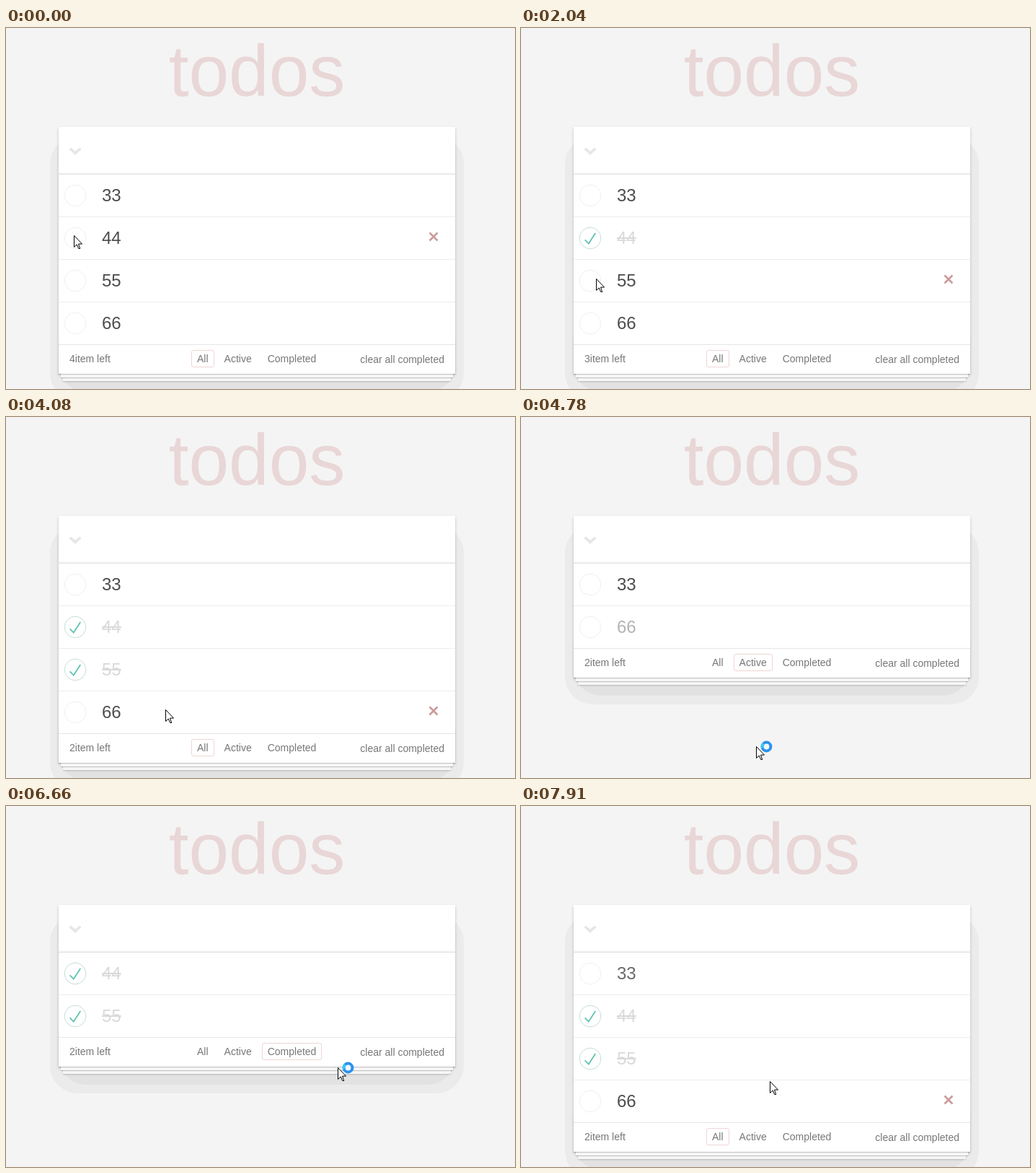
These frames come from a looping animation (706 by 500 pixels, 8 s). An HTML page:

```html
<!DOCTYPE html>
<html lang="en">
<head>
<meta charset="utf-8">
<title>todos</title>
<style>
  html, body { margin: 0; width: 100%; height: 100%; overflow: hidden; background: #f4f4f4; }
  body { position: relative; font: 14px/20px "Liberation Sans", Arial, sans-serif; color: #777; }
  div, span, svg { position: absolute; box-sizing: border-box; white-space: nowrap; }
  svg { overflow: visible; left: 0; top: 0; }
  #title { left: 73px; width: 550px; top: 2px; font-size: 100px; line-height: 115px;
    text-align: center; color: rgba(175, 47, 47, .15); }
  .halo { border-radius: 38px; }
  #outer { left: 61px; width: 574px; top: 150px; background: #ebebeb; }
  #inner { left: 73px; width: 550px; top: 162px; background: #e2e2e2; }
  #card { left: 73px; top: 137px; width: 550px; background: #fff; box-shadow: 0 2px 4px rgba(0, 0, 0, .2); }
  #entry, #list, #footer { left: 0; width: 550px; }
  #entry { top: 0; height: 65px; box-shadow: inset 0 -2px 1px rgba(0, 0, 0, .03); }
  #list { top: 65px; border-top: 1px solid #dfdfdf; }
  .row { left: 0; width: 550px; height: 59px; border-bottom: 1px solid #ededed; }
  .row span { left: 60px; top: 15px; font-size: 24px; line-height: 28px; }
  #footer { bottom: 0; height: 41px; border-top: 1px solid #e6e6e6; }
  #footer::after { content: ""; position: absolute; left: 0; bottom: 0; width: 550px; height: 50px;
    box-shadow: 0 1px 1px rgba(0, 0, 0, .2), 0 8px 0 -3px #f6f6f6, 0 9px 1px -3px rgba(0, 0, 0, .2),
      0 16px 0 -6px #f6f6f6, 0 17px 2px -6px rgba(0, 0, 0, .2); }
  #count { left: 15px; top: 9px; }
  #clear { right: 15px; top: 10px; }
  #filters { left: 184px; top: 7px; display: flex; gap: 6px; }
  #filters span { position: static; padding: 3px 7px; line-height: 16px;
    border: 1px solid transparent; border-radius: 3px; }
</style>
</head>
<body>
<div id="title">todos</div>
<div class="halo" id="outer"></div>
<div class="halo" id="inner"></div>
<div id="card">
  <div id="entry">
    <svg width="40" height="65"><path d="M15.5 30Q20 33 23 36.5Q26 33 30.5 30" fill="none" stroke="#e6e6e6" stroke-width="3.6"/></svg>
  </div>
  <div id="list"></div>
  <div id="footer">
    <span id="count"></span>
    <div id="filters"><span>All</span><span>Active</span><span>Completed</span></div>
    <span id="clear">clear all completed</span>
  </div>
</div>
<svg id="cursor" width="20" height="24" stroke="#000" fill="#fff" stroke-linejoin="round">
  <path id="arrow" d="M.5 .5V16.5L4.2 13 6.7 18.5H8.7L6.5 12.1H11.5Z"/>
  <path id="hand" transform="translate(-5)"
    d="M4 1.5Q5.5 -.5 7 1.5V7Q9 5.5 10 7.5Q12 6 13 8Q15.5 7 16.5 9.5V15Q16 18 14.5 21.5H6.5Q5 18 .8 13.5Q0 11 2 11L4 12.5Z"/>
  <g id="busy" transform="translate(14.5 .5)" stroke-width="4">
    <circle r="5.9" fill="#f2f6fa" stroke="#2a92ef"/>
    <path d="M-5.6 1.8A5.9 5.9 0 0 1 -4 -4.3" fill="none" stroke="#3cc6f2"/>
  </g>
</svg>
<script>
const LOOP = 8000, TICK = 120;
const GLIDE = 540, LAST_STOP = 7910;
const FADE = 400, FADE_LEAD = 40;
const ROW = 59, CARD_TOP = 137, LIST_TOP = 203, FOOTER = 41;

const todos = [33, 44, 55, 66];
const keepers = [() => true, done => !done, done => done];

// Each click leaves a number of ticked todos and a chosen filter.
const scenes = [[0, 0, 0], [1350, 1, 0], [2450, 2, 0], [4780, 2, 1], [6120, 2, 2], [7790, 2, 0]]
  .map(([at, ticked, filter]) => {
    const items = todos.map((value, i) => ({ value, done: i > 0 && i <= ticked }));
    return { at, filter, left: todos.length - ticked, rows: items.filter(item => keepers[filter](item.done)) };
  });

// The pointer sets off at a time towards x, y and arrives one glide later.
const home = { x: 94, y: 287 };
const glides = [[0, 100, 285], [1350, 104, 347], [2450, 349, 449], [3270, 124, 352], [3700, 318, 458],
  [4240, 326, 456], [4780, 364, 436], [5580, 385, 342], [6120, 460, 362], [6940, 272, 341], [7790, 345, 381]]
  .map(([at, x, y]) => ({ at, x, y }));

const $ = id => document.getElementById(id);
const show = (el, on) => { el.style.display = on ? '' : 'none'; };
const mix = (a, b, k) => Math.round(a + (b - a) * k);
const smooth = k => k * k * (3 - 2 * k);

const rows = todos.map((_, i) => {
  const el = document.createElement('div');
  el.className = 'row';
  el.style.top = i * ROW + 'px';
  el.innerHTML = `<svg width="550" height="58" fill="none">
    <g transform="translate(8.2 14.2) scale(.2963)">
      <circle cx="50" cy="50" r="50" stroke-width="3"/>
      <path d="M72 25L42 71 27 56l-4 4 20 20 34-52z" fill="#5dc2af"/>
    </g>
    <path d="M514.5 21.5l11 11m0-11l-11 11" stroke="#cc9a9a" stroke-width="2.6"/></svg><span></span>`;
  $('list').append(el);
  const [check, cross] = el.querySelectorAll('path');
  return { el, check, cross, ring: el.querySelector('circle'), label: el.querySelector('span') };
});
const filters = [...$('filters').children];

function pointerAt(t) {
  const i = glides.findLastIndex(g => g.at <= t);
  const to = glides[i], from = glides[i - 1] ?? home;
  const length = Math.min(GLIDE, (glides[i + 1]?.at ?? LAST_STOP) - to.at);
  const steps = Math.floor(length / TICK);
  const progress = Math.min(1, (t - to.at) / length);
  const k = smooth(Math.floor(progress * steps + 1e-6) / steps);
  return { x: mix(from.x, to.x, k), y: mix(from.y, to.y, k) };
}

function drawRow(row, item, before, age, hovered, last) {
  show(row.el, item);
  if (!item) return;
  const tone = ({ done }) => done ? 217 : 77;
  const remaining = 1 - Math.min(1, (age + FADE_LEAD) / FADE);
  const grey = mix(tone(item), tone(before ?? item), remaining ** 3);
  row.label.textContent = item.value;
  row.label.style.color = `rgb(${grey}, ${grey}, ${grey})`;
  row.label.style.textDecoration = item.done ? 'line-through' : 'none';
  row.ring.setAttribute('stroke', item.done ? '#bddad5' : '#ededed');
  row.el.style.borderBottomColor = last ? 'transparent' : '#ededed';
  show(row.check, item.done);
  show(row.cross, hovered);
}

function render(t) {
  const index = scenes.findLastIndex(s => s.at <= t);
  const scene = scenes[index];
  const age = Math.floor((t - scene.at) / TICK) * TICK;
  const { x, y } = pointerAt(t);
  const count = scene.rows.length;
  const footTop = LIST_TOP + count * ROW - 1;
  const height = footTop + FOOTER - CARD_TOP;

  $('card').style.height = $('inner').style.height = height + 'px';
  $('outer').style.height = height + 24 + 'px';
  $('count').textContent = scene.left + 'item left';

  const overRow = y < footTop ? Math.floor((y - LIST_TOP) / ROW) : -1;
  rows.forEach((row, i) =>
    drawRow(row, scene.rows[i], scenes[index - 1]?.rows[i], age, i === overRow, i === count - 1));

  let overLink = false;
  filters.forEach((el, i) => {
    const box = el.getBoundingClientRect();
    const over = x >= box.left && x < box.right && y >= box.top && y < box.bottom;
    overLink ||= over;
    el.style.borderColor = `rgba(175, 47, 47, ${i === scene.filter ? .2 : over ? .1 : 0})`;
  });

  $('cursor').style.transform = `translate(${x}px, ${y}px)`;
  show($('hand'), overLink);
  show($('arrow'), !overLink);
  show($('busy'), !overLink && scene.filter > 0);
}

function frame() {
  render(performance.now() % LOOP);
  requestAnimationFrame(frame);
}
frame();
</script>
</body>
</html>
```
